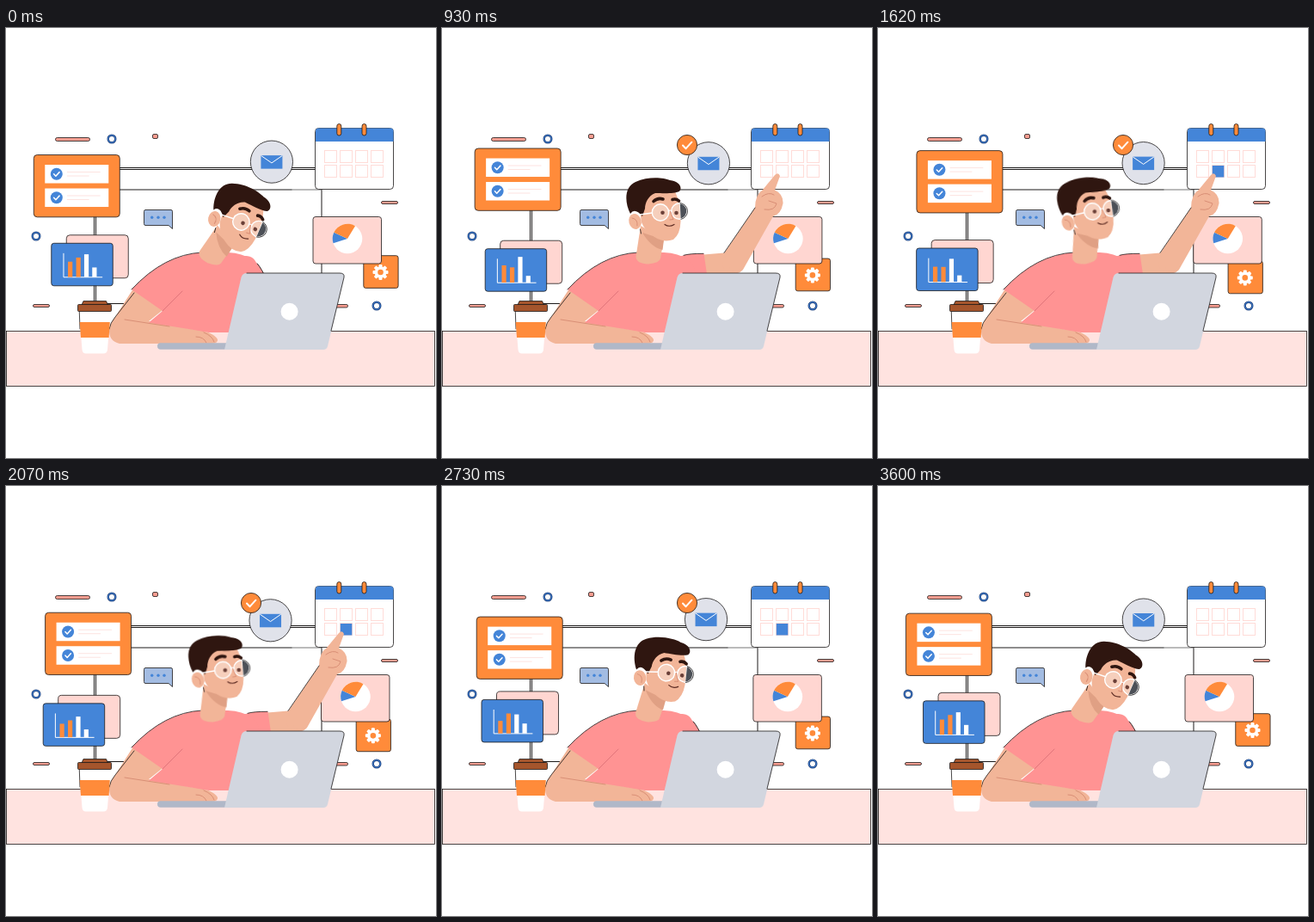
An HTML page without scripts that plays this animation: 500x500 px, repeating every 3660 ms.

```html
<!DOCTYPE html>
<html lang="en">
<head>
<meta charset="utf-8">
<title>Planning at the desk</title>
<style>
  html, body { margin: 0; width: 100%; height: 100%; overflow: hidden; background: #fff; }
  svg { display: block; width: 100vw; height: 100vh; }

  :root { --loop: 3660ms; }
  .orange { fill: #ff8b3a; }
  .blue { fill: #4485d8; }
  .white { fill: #fff; }
  .blush { fill: #ffd6d1; }
  .skin { fill: #f2b598; }
  .shirt { fill: #ff9393; }
  .hair { fill: #2f1610; }
  .edge { stroke: #1c1a1a; stroke-width: .8; }
  .line { fill: none; stroke-linecap: round; stroke-linejoin: round; }
  .tick { stroke: #fff; stroke-width: 1.5; }
  .crease { stroke: #d98f76; stroke-width: 1; }

  /* Sine drift: --x/--y are amplitudes, --peak is when they are reached. */
  .sway, .bar {
    animation: sway calc(var(--loop) / 2) cubic-bezier(.37, 0, .63, 1) infinite alternate;
    animation-delay: calc(var(--peak) - 1.5 * var(--loop));
  }
  .sway { --x: 0px; --y: 0px; }
  .bar { animation-name: grow; transform-box: fill-box; transform-origin: 50% 100%; }
  @keyframes sway {
    from { translate: calc(-1 * var(--x)) calc(-1 * var(--y)); }
    to { translate: var(--x) var(--y); }
  }
  @keyframes grow {
    from { scale: 1 calc(1 - var(--a)); }
    to { scale: 1 calc(1 + var(--a)); }
  }

  .head, .arm, .forearm, .badge, .day { animation: var(--loop) ease-in-out infinite; }
  .head { animation-name: nod; transform-origin: 240px 262px; }
  .arm { animation-name: reach; --down: 65deg; transform-origin: 279px 278px; }
  .forearm { animation-name: reach; --down: 26deg; transform-origin: 338px 273px; }
  .badge { animation-name: pop; transform-origin: 285px 136px; }
  .day { animation-name: mark; }
  @keyframes nod {
    0%, 1% { rotate: 26deg; }
    14%, 26% { rotate: 0deg; }
    44% { rotate: -5.5deg; }
    57% { rotate: -2deg; }
    74.6% { rotate: 8.5deg; animation-timing-function: ease-out; }
    92%, 100% { rotate: 26deg; }
  }
  @keyframes reach {
    0%, 1%, 73%, 100% { rotate: var(--down); }
    14.5%, 58% { rotate: 0deg; }
  }
  @keyframes pop {
    0%, 17% { scale: 0; }
    22%, 80% { scale: 1; }
    84%, 100% { scale: 0; }
  }
  @keyframes mark {
    0%, 32% { opacity: 0; }
    36%, 80% { opacity: 1; }
    84%, 100% { opacity: 0; }
  }
</style>
</head>
<body>
<svg viewBox="0 0 500 500">
  <defs>
    <g id="task">
      <rect class="white" width="74" height="21.5"/>
      <circle class="blue" cx="13.5" cy="10.7" r="7"/>
      <path class="line tick" d="M10.3 10.8l2.3 2.4 4.2-4.6"/>
      <path class="line" stroke="#fde3e0" d="M26 8.5h38M26 13h25"/>
    </g>
    <g id="row" fill="#fff" stroke="#ffdcd8">
      <rect width="14" height="14"/>
      <rect x="18" width="14" height="14"/>
      <rect x="36" width="14" height="14"/>
      <rect x="54" width="14" height="14"/>
    </g>
    <g id="ring">
      <circle r="4.3" fill="#fff" stroke="#1f3f78" stroke-width="2.4"/>
      <circle r="4.3" fill="none" stroke="#4485d8"/>
    </g>
    <rect id="pin" class="orange edge" x="-2.5" y="111.5" width="5" height="13.5" rx="2.5"/>
    <rect id="tooth" class="white" x="-2" y="-9" width="4" height="18" rx="1"/>
  </defs>

  <!-- Connectors -->
  <g class="line" stroke="#1c1a1a">
    <path d="M120 162.5H360M120 164.5H360M120 188H332M367 188V300"/>
    <path d="M102.5 200V320.5M104.5 200V320.5H200"/>
    <path stroke="#777" d="M332 188H367"/>
  </g>

  <!-- Small decorations -->
  <g fill="#fa9d90" class="edge">
    <rect x="57.5" y="127.5" width="40" height="4" rx="2"/>
    <rect x="170.5" y="123.5" width="6" height="5" rx="1.5"/>
    <rect x="436.5" y="201.5" width="19" height="3" rx="1.5"/>
    <rect x="31.5" y="321.5" width="19" height="3" rx="1.5"/>
    <rect x="380" y="321.5" width="17.5" height="3.5" rx="1.7"/>
  </g>
  <use href="#ring" x="123" y="129"/>
  <use href="#ring" x="35" y="242"/>
  <use href="#ring" x="431" y="323"/>
  <path fill="#a3bce2" class="edge" d="M162 211.5H192Q193.5 211.5 193.5 213.5V233.5L189 229.5H162Q160.5 229.5 160.5 227.5V213.5Q160.5 211.5 162 211.5Z"/>
  <g class="blue"><circle cx="169.7" cy="220.2" r="1.7"/><circle cx="177" cy="220.2" r="1.7"/><circle cx="184" cy="220.2" r="1.7"/></g>

  <!-- Calendar -->
  <rect class="white edge" x="359.5" y="116.5" width="91" height="71" rx="4"/>
  <path class="blue" d="M360 132V120Q360 116.5 363.5 116.5H447Q450.5 116.5 450.5 120V132Z"/>
  <use href="#pin" x="387.3"/>
  <use href="#pin" x="416.5"/>
  <use href="#row" x="370.5" y="142.5"/>
  <use href="#row" x="370.5" y="159.5"/>
  <rect class="day blue" x="388.8" y="160" width="13.5" height="13.5"/>

  <!-- Task list -->
  <g class="sway" style="--x:6.8px;--peak:1920ms"><g class="sway" style="--y:6.2px;--peak:2880ms">
    <g transform="translate(39 146.1)">
      <rect class="orange edge" width="100" height="72.3" rx="4"/>
      <use href="#task" x="13" y="11.5"/>
      <use href="#task" x="13" y="39"/>
    </g>
  </g></g>

  <!-- Bar chart -->
  <g class="sway" style="--x:5px;--peak:250ms"><g class="sway" style="--y:4.7px;--peak:1200ms">
    <g transform="translate(48.2 252.5)">
      <rect class="blush edge" x="17.5" y="-9.5" width="72" height="50" rx="4"/>
      <rect class="blue edge" width="71.5" height="49.5" rx="3"/>
      <path class="line" stroke="#fff" d="M14.2 12V39.5H59"/>
      <rect class="bar orange" style="--a:.16;--peak:800ms" x="19.3" y="22" width="5.2" height="17.3"/>
      <rect class="bar orange" style="--a:.17;--peak:3130ms" x="28.8" y="18.8" width="5.2" height="20.5"/>
      <rect class="bar white" style="--a:.15;--peak:850ms" x="38.2" y="13.3" width="5.2" height="26"/>
      <rect class="bar white" style="--a:.24;--peak:3130ms" x="47.5" y="29.6" width="5.2" height="9.7"/>
    </g>
  </g></g>

  <!-- Settings and pie chart -->
  <g class="sway" style="--x:-4.5px;--y:3.3px;--peak:1830ms">
    <rect class="orange edge" x="411.3" y="268" width="40.3" height="37.7" rx="2.5"/>
    <g transform="translate(431 287.3)">
      <use href="#tooth"/>
      <use href="#tooth" transform="rotate(45)"/>
      <use href="#tooth" transform="rotate(90)"/>
      <use href="#tooth" transform="rotate(135)"/>
      <circle class="white" r="6.8"/>
      <circle class="orange" r="3.3"/>
    </g>
  </g>
  <g class="sway" style="--x:5px;--peak:1800ms">
    <rect class="blush edge" x="362" y="219.5" width="79.5" height="54.5" rx="3"/>
    <g transform="translate(402 245)">
      <circle class="white" r="17.3"/>
      <path class="blue" d="M0 0L-16.5 5.2A17.3 17.3 0 0 1-15.7-7.3Z"/>
      <path class="orange" d="M0 0L-15.7-7.3A17.3 17.3 0 0 1 9-14.8Z"/>
    </g>
  </g>

  <!-- Mail -->
  <g class="sway" style="--x:1.5px;--peak:750ms"><g class="sway" style="--y:1.2px;--peak:1200ms">
    <circle class="edge" fill="#e0e2ea" cx="308.5" cy="156.2" r="24.6"/>
    <rect class="blue" x="296" y="148.7" width="25" height="15.5"/>
    <path class="line" stroke="#fff" d="M296.5 149.2L308.5 157.5 320.5 149.2"/>
  </g></g>
  <g class="badge">
    <circle class="orange edge" cx="285" cy="136" r="11.6"/>
    <path class="line" stroke="#fff" stroke-width="2" d="M280 136.5l3.6 3.7 6.8-7.5"/>
  </g>

  <!-- Pointing arm -->
  <g class="arm">
    <path class="skin" d="M298 264L328 261.5 350 281Q346 285.5 340 285.5H300Z"/>
    <g class="forearm">
      <circle class="skin" cx="338" cy="273" r="12"/>
      <path class="skin" d="M328 262L364 209Q364 194 373 188L387 171Q391 167 393 172L387 188.5Q397 193 396.5 204 394 217 385 219L350 281 336 283Z"/>
      <path class="line edge" d="M328 261.5L364 209"/>
      <path class="line crease" d="M372 196Q380 190 386 194M375 211Q387 213 389 204L380 201"/>
    </g>
    <path class="shirt" d="M279 265Q286 262 304.5 262.3L308 286 279 291A13 13 0 0 1 279 265Z"/>
    <path class="line edge" d="M281 264.3Q288 262.2 304 262.3"/>
  </g>

  <rect class="edge" fill="#ffe3e0" x=".5" y="352.5" width="498" height="64"/>

  <!-- Resting arm and torso -->
  <path class="skin" d="M148 303L186 325 166 341 215 350Q240 352 246 362 247 367 238 367H132Q119 364 120 350 121 343 127 336Z"/>
  <path class="line edge" d="M149 308L127 336Q121 343 120 350"/>
  <path class="shirt" d="M146 304Q184 263 230 261H258Q293 263 295 288L290 354H236L215 350.5 166 342.5 182 329Z"/>
  <path class="line edge" d="M182 290"/>
  <path class="line edge" d="M146 304Q184 263 228 261"/>
  <path class="line" stroke="#e2747a" d="M182 329L205 306"/>
  <path class="line crease" d="M138 339L167 343.5 190 347M221 359Q230 359 233 366M230 354Q240 358 242 365"/>

  <!-- Head -->
  <g class="head">
    <path class="skin" d="M231 230L225.5 266Q226 274 240 274.5 253 273 254 268L258 245Z"/>
    <path fill="#e0a084" d="M233 238Q243 255 256.5 258L258 246Z"/>
    <path class="skin" d="M229 205L240 190H271L276 203 277.5 225Q277 240 269 246 258 250 247 243 236 236 232 226Z"/>
    <path class="hair" d="M219 216C212 202 212 185 225 179 240 172 258 174 265 177 276 178 280 186 276 190 270 193 256 192 248 192 240 195 236 203 236 210L233 219Q224 208 219 216Z"/>
    <ellipse class="skin" cx="224.5" cy="225" rx="7.2" ry="9" transform="rotate(-15 224.5 225)"/>
    <path class="line crease" d="M221 221Q228 222 227 230"/>
    <path class="line edge" d="M230.5 234L231.5 239"/>
    <g class="line" stroke="#2f1610" stroke-width="3.6">
      <path d="M246 201.5Q251 197 257 199M268 199.5Q272 198 275.5 201"/>
    </g>
    <g fill="#fff" fill-opacity=".35" stroke="#fff" stroke-width="1.4">
      <circle cx="254" cy="214.5" r="9.7"/>
      <circle cx="276" cy="213" r="9.3"/>
      <path class="line" d="M244.5 215L230 217M263.5 213Q265 211.5 267 213"/>
    </g>
    <path fill="#4c5057" d="M276.8 204.2A8.9 8.9 0 0 1 277.6 221.6Z"/>
    <path class="line edge" d="M277 203.5A9.6 9.6 0 0 1 278 222.4"/>
    <circle fill="#6b4038" cx="256.5" cy="214.8" r="2.3"/>
    <circle fill="#6b4038" cx="272.5" cy="215" r="2.3"/>
    <path class="line crease" d="M265.5 213L269 222.5 265 223"/>
    <path class="line" stroke="#5b2a22" stroke-width="1.2" d="M259 228.5Q264 232 270 228.5"/>
  </g>

  <!-- Laptop -->
  <rect fill="#b0b8c8" x="176" y="366.3" width="90" height="7.4" rx="3.7"/>
  <path fill="#d2d6df" d="M280 285H388Q394 285 393 290L374 370Q373 374 369 374H254L273.5 290Q275 285 280 285Z"/>
  <path class="line edge" d="M280 285H388Q394 285 393 290L378 352"/>
  <circle class="white" cx="329.6" cy="329.7" r="10"/>

  <!-- Coffee -->
  <path class="white" d="M85 329H121.5L118 374Q117.5 378.5 113 378.5H93Q89 378.5 88.5 374Z"/>
  <path class="line edge" d="M85.3 330L86 350"/>
  <path class="orange" d="M85.7 342H120.8L119.6 360H87Z"/>
  <g fill="#a5552c" class="edge">
    <path d="M90 317.5H116.5L118.5 322H88Z"/>
    <rect x="83.5" y="321.5" width="39" height="8" rx="1"/>
  </g>
</svg>
</body>
</html>
```
